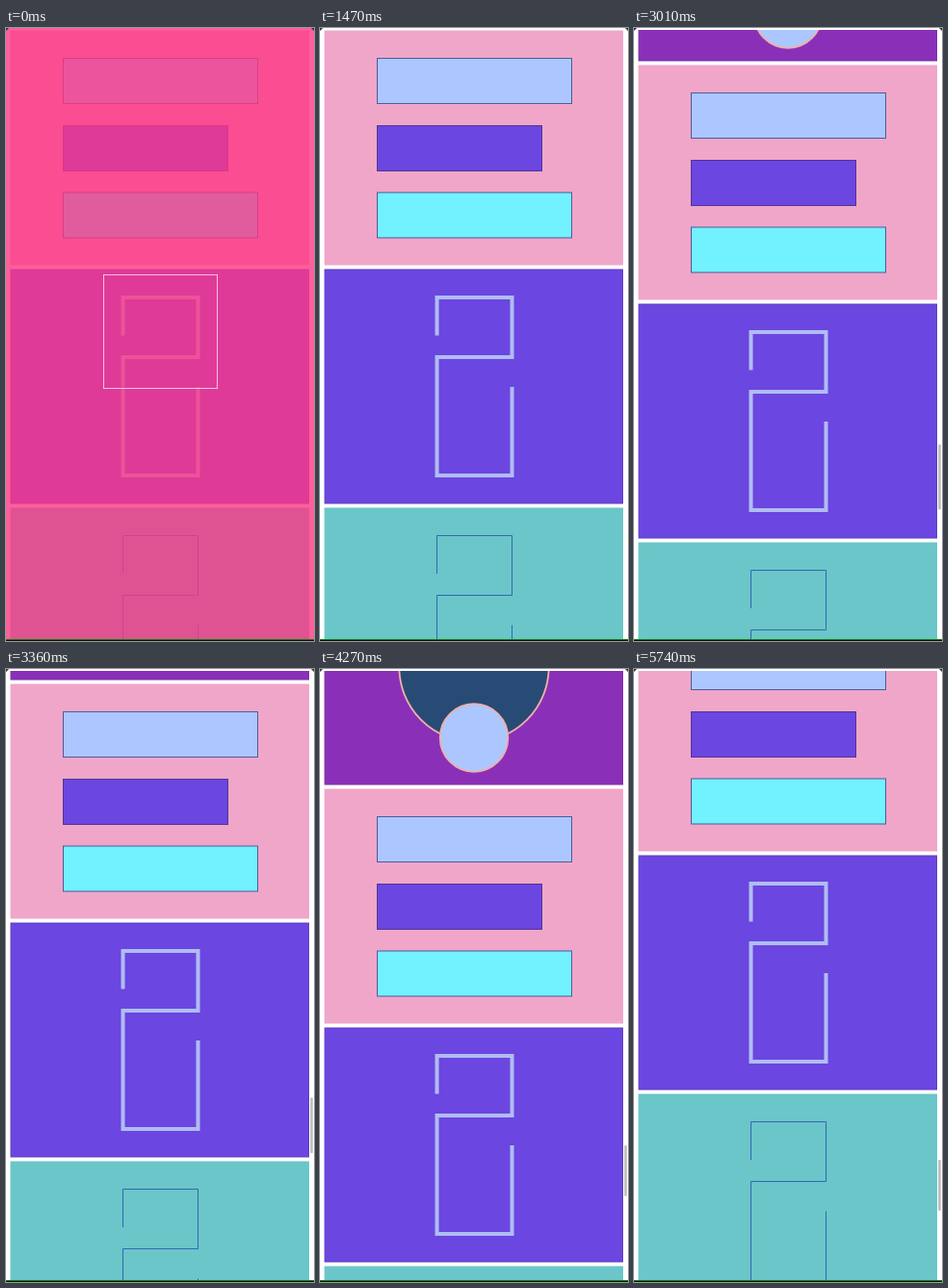
Recreate the animation shown at these times as an HTML page. Size 320 px wide and 637 px high, loop 5810 ms.

```html
<!DOCTYPE html>
<html lang="en">
<head>
<meta charset="utf-8">
<title>Endless panels</title>
<style>
html, body { margin: 0; width: 100%; height: 100%; overflow: hidden; background: #fff; }
svg { display: block; width: 100%; height: 100%; }
</style>
</head>
<body>
<svg viewBox="0 0 320 637">
  <defs>
    <clipPath id="view"><rect y="2" width="320" height="633"/></clipPath>
    <path id="two" d="M0 69V29.5H78V91.5H0V214.5H78V122.5" fill="none"/>
    <g id="cycle">
      <g>
        <rect x="4.5" y=".5" width="310.5" height="244" fill="#f0a6c8"/>
        <g stroke="#4a5c9c">
          <rect x="59.5" y="29.5" width="202" height="47" fill="#acc7ff"/>
          <rect x="59.5" y="99.5" width="171" height="47" fill="#6b46e0" stroke="#4f3597"/>
          <rect x="59.5" y="169" width="202" height="47" fill="#72f1ff"/>
        </g>
      </g>
      <g transform="translate(0 248)">
        <rect x="5" y="1" width="309.5" height="243" fill="#6b46e0" stroke="#5c3fc4"/>
        <use href="#two" x="121.5" y=".5" stroke="#afbdf2" stroke-width="4"/>
      </g>
      <g transform="translate(0 496)">
        <rect x="4.5" y=".5" width="310.5" height="244" fill="#6ac6c8"/>
        <use href="#two" x="121.5" stroke="#3565b4"/>
      </g>
      <g transform="translate(0 744)">
        <rect x="5" y="1" width="309.5" height="243" fill="#8a30b8" stroke="#7d2ca6"/>
        <g stroke="#f0b0a8" stroke-width="1.8">
          <circle cx="160" cy="122" r="77.7" fill="#274b75"/>
          <rect x="191.5" y="48.5" width="54" height="54" fill="#4333e0"/>
          <circle cx="160" cy="195.5" r="35.3" fill="#acc7ff"/>
        </g>
      </g>
    </g>
  </defs>
  <rect width="320" height="637" fill="#fff"/>
  <g clip-path="url(#view)">
    <g id="track">
      <use href="#cycle"/>
      <use href="#cycle" y="992"/>
    </g>
  </g>
  <rect id="thumb" x="316.2" width="2.6" rx="1.3" fill="#bcbcbc"/>
  <g id="cover">
    <rect width="320" height="637" fill="#fd3885" opacity=".8"/>
    <rect x="101.5" y="256.5" width="118" height="118" fill="none" stroke="#ffc0e4"/>
  </g>
  <path d="M0 635.5H320" stroke="#148014"/>
  <path d="M0 636.5H320" stroke="#061006"/>
  <path d="M0 0H3L0 3ZM320 0H317L320 3Z" fill="#333"/>
</svg>
<script>
const LOOP = 5810, STEP = 70, CYCLE = 992, END = 6021;
const FLICK = 2293, RELEASE = 2520, FADE = 550;
// [time, distance left]: momentum decays exponentially between these
const glide = [[RELEASE, 5140], [3010, 2089], [3780, 483], [4830, 66], [5740, 12], [LOOP, 10.5]];
const $ = id => document.getElementById(id);
const track = $('track'), thumb = $('thumb'), cover = $('cover');

function scrollAt(t) {
  if (t < FLICK) return 0;
  if (t < RELEASE) return 881 * ((t - FLICK) / (RELEASE - FLICK)) ** 2.5;
  let i = 0;
  while (i < glide.length - 2 && t >= glide[i + 1][0]) i++;
  const [t0, a] = glide[i], [t1, b] = glide[i + 1];
  return END - a * (b / a) ** ((t - t0) / (t1 - t0));
}

// The thumb shrinks as more panels are appended
function thumbAt(s) {
  const [rate, size] = s < 4300 ? [0.109, 68] : s < 5750 ? [0.0892, 58] : [0.0842, 53];
  return { y: 4 + s * rate, size };
}

function draw(t) {
  const s = Math.round(scrollAt(t));
  track.setAttribute('transform', `translate(0 ${2 - s % CYCLE})`);
  const { y, size } = thumbAt(s);
  thumb.setAttribute('y', y);
  thumb.setAttribute('height', size);
  thumb.setAttribute('opacity', s > 0 ? 1 : 0);
  cover.setAttribute('opacity', Math.max(0, 1 - t / FADE) ** 1.3);
}

const start = performance.now();
function tick() {
  // The picture holds for one step at a time
  const t = (performance.now() - start) % LOOP;
  draw(Math.floor(t / STEP) * STEP);
  requestAnimationFrame(tick);
}
draw(0);
requestAnimationFrame(tick);
</script>
</body>
</html>
```
